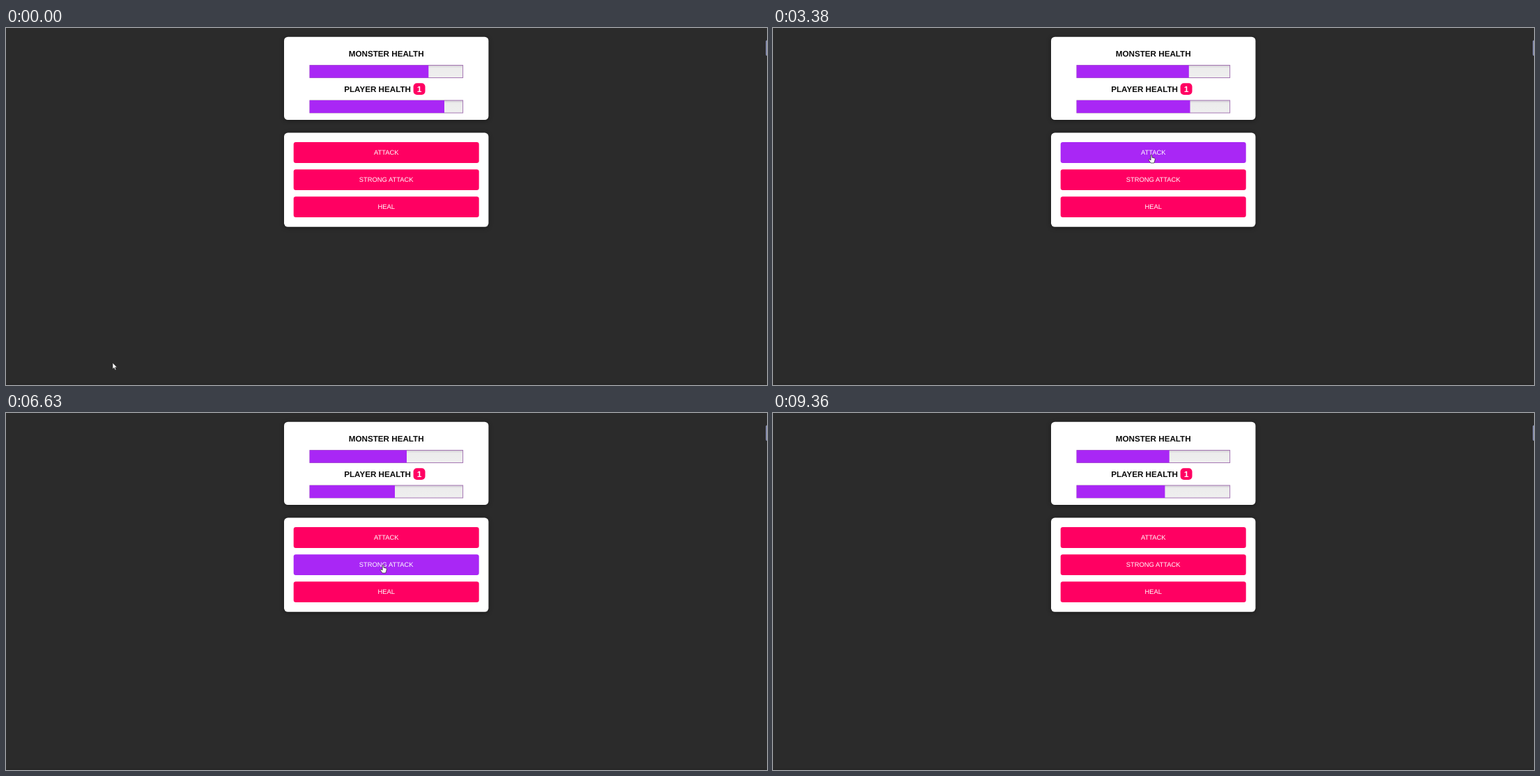
An HTML page that plays this animation: 1092x513 px, repeating every 9490 ms.

```html
<!DOCTYPE html>
<html lang="en">
<head>
<meta charset="utf-8">
<title>Monster Duel</title>
<style>
  html, body { margin: 0; width: 100%; height: 100%; overflow: hidden; background: #2b2b2b; }
  svg { display: block; width: 1092px; height: 513px; }
  text { font-family: "Liberation Sans", Arial, sans-serif; text-rendering: geometricPrecision; }
  .card { fill: #fff; filter: drop-shadow(0 1px 3px rgba(0, 0, 0, .4)); }
  .title { font-size: 11.65px; font-weight: 700; fill: #0c0c0c; }
  .label { font-size: 9.4px; fill: #fff; text-anchor: middle; }
  .button { fill: #ff0062; }
  .button.hover, .fill { fill: #a927f5; }
  .cursor { fill: #fff; stroke: #222; stroke-width: .7; stroke-linejoin: round; }
</style>
</head>
<body>
<svg viewBox="0 0 1092 513">
  <defs>
    <linearGradient id="inset" x2="0" y2="1">
      <stop offset="0" stop-color="#cfcbd2"/>
      <stop offset=".22" stop-color="#ececec"/>
      <stop offset="1" stop-color="#efefef"/>
    </linearGradient>
  </defs>
  <rect width="1092" height="513" fill="#2b2b2b"/>
  <rect y="511" width="1092" height="2" fill="#272727"/>
  <rect x="1090.3" y="17.5" width="6" height="22.5" rx="2" fill="#8d94b8"/>

  <rect class="card" x="399" y="12.7" width="293.4" height="119.3" rx="5.5"/>
  <rect class="card" x="399" y="150.6" width="293.4" height="135.2" rx="5.5"/>

  <text class="title" x="545.7" y="41.2" text-anchor="middle">MONSTER HEALTH</text>
  <text class="title" x="485.2" y="91.7">PLAYER HEALTH</text>
  <rect x="584.6" y="79.2" width="16.9" height="16.8" rx="5" fill="#ff0062"/>
  <text x="593" y="91.6" font-size="12" font-weight="700" fill="#fff" text-anchor="middle">1</text>

  <g id="bars"></g>
  <g id="buttons"></g>
  <g class="cursor">
    <path id="arrow" d="M0 0V9.2L2.1 7.3 3.6 10.6 5.1 9.9 3.7 6.8H6.5Z"/>
    <path id="hand" d="M-.9.9Q0-.4.9.9V4.1L4.3 4.9Q5.4 5.3 5.3 6.5L4.6 9.6 3.7 12H-.9L-3.8 8Q-4.6 6.8-3.3 6.5L-.9 7.8Z"/>
  </g>
</svg>
<script>
const LOOP = 9490, STEP = 130;
const $ = id => document.getElementById(id);

// [time, x, y] of the pointer tip
const path = [
  [0, 153, 481], [390, 262, 420], [780, 420, 318], [1040, 468, 285], [1430, 478, 261],
  [2340, 478, 261], [2730, 508, 228], [3120, 543, 182],
  [3380, 543, 182], [3900, 541, 218],
  [7020, 541, 218], [7410, 538, 290], [7670, 537, 264],
  [8060, 537, 264], [8450, 400, 340], [8970, 112, 498], [9230, 90, 530], [LOOP, 90, 530]
];

// [time, monster bar end, player bar end]
const rounds = [
  [0, 606.3, 629], [3250, 596.8, 598.5], [4160, 584.2, 591],
  [5070, 579.5, 574], [6630, 575, 558], [7150, 568.7, 540], [7800, 568.7, 562.4]
];

function add(parent, tag, attrs, text = "") {
  const el = document.createElementNS("http://www.w3.org/2000/svg", tag);
  for (const key in attrs) el.setAttribute(key, attrs[key]);
  el.textContent = text;
  return parent.appendChild(el);
}

const bars = [53.5, 104].map(y => {
  add($("bars"), "rect", { x: 436, y, width: 219.6, height: 18, fill: "url(#inset)", stroke: "#a576b3", "stroke-width": 1 });
  return add($("bars"), "rect", { class: "fill", x: 435.7, y, height: 18 });
});

const buttons = ["ATTACK", "STRONG ATTACK", "HEAL"].map((name, i) => {
  const y = 164.1 + i * 39.05;
  const el = add($("buttons"), "rect", { class: "button", x: 412.7, y, width: 266, height: 29.8, rx: 3.2 });
  add($("buttons"), "text", { class: "label", x: 545.7, y: y + 18 }, name);
  return { el, y };
});

function pointerAt(t) {
  const i = path.findIndex(p => p[0] > t);
  const [t0, x0, y0] = path[i - 1], [t1, x1, y1] = path[i];
  const k = (t - t0) / (t1 - t0);
  return [x0 + (x1 - x0) * k, y0 + (y1 - y0) * k];
}

function draw(now) {
  const t = Math.floor(now % LOOP / STEP) * STEP;
  const [x, y] = pointerAt(t);
  let over = false;
  for (const b of buttons) {
    const hit = x > 412.7 && x < 678.7 && y > b.y && y < b.y + 29.8;
    b.el.classList.toggle("hover", hit);
    over = over || hit;
  }
  for (const id of ["arrow", "hand"]) {
    $(id).setAttribute("transform", `translate(${x} ${y})`);
    $(id).style.display = (id === "hand") === over ? "" : "none";
  }
  const round = rounds.filter(r => r[0] <= t).pop();
  bars.forEach((bar, i) => bar.setAttribute("width", round[i + 1] - 435.7));
}

const start = performance.now();
function tick() {
  draw(performance.now() - start);
  requestAnimationFrame(tick);
}
tick();
</script>
</body>
</html>
```
